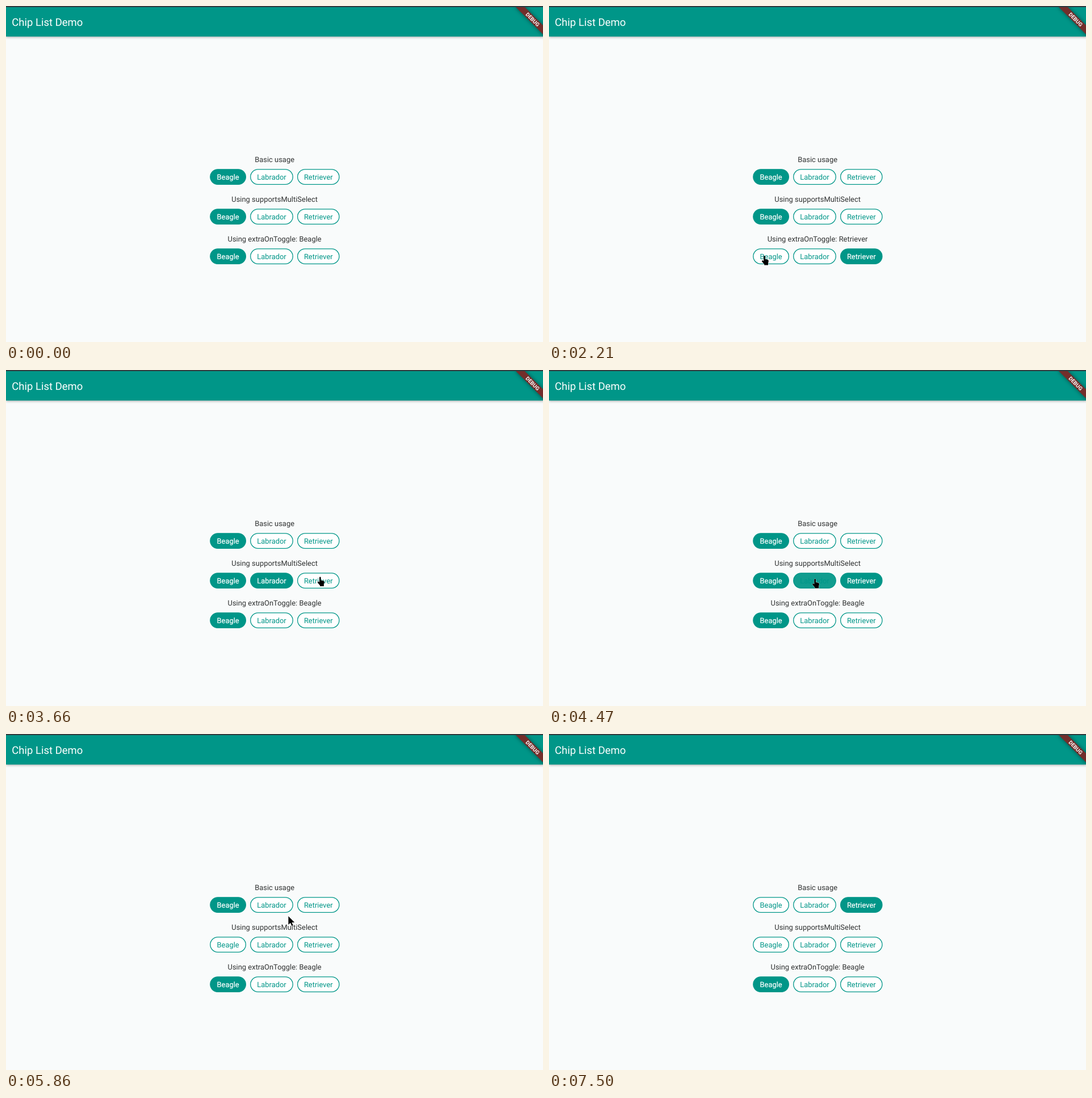
An HTML page that plays this animation: 946 px wide and 592 px high, repeating every 8.38 s.

```html
<!DOCTYPE html>
<html lang="en">
<head>
<meta charset="utf-8">
<title>Chip List Demo</title>
<style>
  html, body { margin: 0; width: 100%; height: 100%; overflow: hidden; background: #f9fbfb; }
  svg { display: block; width: 946px; height: 592px; font: 12.95px Roboto, sans-serif; text-rendering: geometricPrecision; }
  text { text-anchor: middle; }
  .label { fill: #303232; }
  .bar { fill: #009688; filter: drop-shadow(0 1.5px 2px rgba(0, 0, 0, .35)); }
  .title { fill: #fff; font-size: 18.5px; text-anchor: start; }
  .ribbon { fill: #732e2b; filter: drop-shadow(0 0 3.7px rgba(0, 0, 0, .5)); }
  .debug { fill: #fff; font-size: 9.4px; font-weight: 700; }
  .base { fill: #fff; }
  .face { fill: #009688; stroke: #009688; stroke-width: 1.3; }
  .chip text { fill: #009688; }
  .chip.on text { fill: #fff; stroke: #fff; stroke-width: .2; }
  #cursor { fill: #000; stroke: #fff; stroke-width: .7; stroke-linejoin: round; paint-order: stroke; }
</style>
</head>
<body>
<svg viewBox="0 0 946 592">
  <rect class="bar" width="946" height="53.8"/>
  <rect width="946" height="2" fill="#303b3e"/>
  <text class="title" x="10.3" y="34.5">Chip List Demo</text>
  <svg y="2" width="946" height="590" viewBox="0 2 946 590">
    <g transform="translate(950 1.5) rotate(45)">
      <rect class="ribbon" x="-37" y="25.9" width="74" height="11.1"/>
      <text class="debug" y="34.8">DEBUG</text>
    </g>
  </svg>
  <g id="rows"></g>
  <path id="cursor"/>
</svg>
<script>
const LOOP = 8380, ENTER = 390, EXIT = 7500;
const LABELS = ["Basic usage", "Using supportsMultiSelect", "Using extraOnToggle: "];
const MULTI_ROW = 1, EXTRA_ROW = 2;
const CHIP_TOP = 287.2, CHIP_H = 27.8, PITCH = 70, GAP = 7.1, STROKE = 1.3;

let nextX = 359.2;
const CHIPS = [["Beagle", 63.8], ["Labrador", 75.8], ["Retriever", 74.6]].map(([name, width]) => {
  const x = nextX;
  nextX += width + GAP;
  return { name, width, x, middle: x + width / 2 };
});

// Each row is clicked at a steady pace; aim is the pointer's offset from a chip's centre
// and dip is how far it sags while travelling along the row.
const VISITS = [
  { row: 2, order: [1, 2, 0], start: 845, step: 775, aim: [-11.5, -1], dip: 58 },
  { row: 1, order: [1, 2, 1, 0, 2], start: 3300, step: 560, aim: [-2.5, 1], dip: 16 },
  { row: 0, order: [1, 2], start: 6530, step: 450, aim: [7.75, 10], dip: 0 }
];
const SLANT = [3.25, -4], PRESS_LEAD = 180, LINGER = 50, TRAVEL = 400;

const CLICKS = VISITS.flatMap(({ row, order, start, step, aim, dip }) => order.map((chip, k) => ({
  row, chip, time: start + k * step, dip: k ? dip : 0,
  x: CHIPS[chip].middle + aim[0] + SLANT[0] * chip,
  y: CHIP_TOP + CHIP_H / 2 + row * PITCH + aim[1] + SLANT[1] * chip
})));
const STOPS = [
  { time: ENTER - LINGER, x: 470, y: 567 },
  ...CLICKS,
  { time: EXIT + PRESS_LEAD, x: 845, y: 575, dip: 0 }
];

const HAND = "M-1.4 1.1C-1.4-.5 1.2-.5 1.2 1.1V5.8L5.2 6.6Q7.5 7.1 7.2 9.5L6.4 13.5V16.4H-.4V15L-4.4 10.1Q-5.1 8.8-3.8 8.2Q-2.8 8-1.4 9.5Z";
const ARROW = "M0 0V15L3.6 11.8 6 17 8.3 16 6 11H10.8Z";

const clamp = v => Math.max(0, Math.min(1, v));
const smooth = u => u * u * (3 - 2 * u);

function add(parent, tag, attrs, content = "") {
  const node = document.createElementNS("http://www.w3.org/2000/svg", tag);
  for (const key in attrs) node.setAttribute(key, attrs[key]);
  node.textContent = content;
  return parent.appendChild(node);
}

const rowsGroup = document.getElementById("rows");
const cursor = document.getElementById("cursor");
const rows = LABELS.map((text, row) => {
  const group = add(rowsGroup, "g", { transform: `translate(0 ${row * PITCH})` });
  const label = add(group, "text", { class: "label", x: 473.1, y: 275 }, text);
  const chips = CHIPS.map(({ name, width, x, middle }) => {
    const chip = add(group, "g", { class: "chip" });
    const box = {
      x: x + STROKE / 2, y: CHIP_TOP + STROKE / 2, rx: (CHIP_H - STROKE) / 2,
      width: width - STROKE, height: CHIP_H - STROKE
    };
    const base = add(chip, "rect", { class: "base", ...box });
    const face = add(chip, "rect", { class: "face", ...box });
    add(chip, "text", { x: middle, y: 306 }, name);
    return { chip, base, face };
  });
  return { label, chips };
});

function pointerAt(t) {
  const next = STOPS.findIndex((stop, i) => i > 0 && (t < stop.time || i === STOPS.length - 1));
  const from = STOPS[next - 1], to = STOPS[next];
  const leave = from.time + LINGER;
  const duration = Math.min(TRAVEL, to.time - PRESS_LEAD - leave);
  const u = smooth(clamp((t - leave) / duration));
  return [
    from.x + (to.x - from.x) * u,
    from.y + (to.y - from.y) * u + to.dip * Math.sin(Math.PI * u)
  ];
}

function overChip(px, py) {
  return LABELS.some((_, row) => {
    const below = py - CHIP_TOP - row * PITCH;
    return below >= 0 && below <= CHIP_H &&
      CHIPS.some(({ x, width }) => px >= x - 1 && px <= x + width + 1);
  });
}

function stateAt(t) {
  const state = LABELS.map(() => CHIPS.map((_, i) => ({ on: i === 0, since: -LOOP, press: 0 })));
  for (const { time, row, chip: clicked } of CLICKS) {
    const press = clamp((t - time + PRESS_LEAD) / 60) * clamp((time + 40 - t) / 70);
    state[row].forEach((chip, i) => {
      const hit = i === clicked;
      if (hit) chip.press = Math.max(chip.press, press);
      const on = row === MULTI_ROW ? chip.on !== hit : hit;
      if (t >= time && on !== chip.on) Object.assign(chip, { on, since: time });
    });
  }
  return state;
}

function draw(t) {
  const state = stateAt(t);
  state.forEach((row, r) => row.forEach(({ on, since, press }, i) => {
    const { chip, base, face } = rows[r].chips[i];
    const age = t - since;
    chip.classList.toggle("on", on);
    face.style.fillOpacity = on ? 1 - (1 - clamp(age / 100)) ** 4 : 1 - clamp(age / 200) ** 2;
    base.style.filter = press ? `drop-shadow(0 3px 3px rgba(0, 0, 0, ${.3 * press}))` : "none";
  }));
  const chosen = state[EXTRA_ROW].findIndex(chip => chip.on);
  rows[EXTRA_ROW].label.textContent = LABELS[EXTRA_ROW] + CHIPS[chosen].name;

  const [x, y] = pointerAt(t);
  cursor.style.display = t >= ENTER && t < EXIT ? "" : "none";
  cursor.setAttribute("d", overChip(x, y) ? HAND : ARROW);
  cursor.setAttribute("transform", `translate(${x} ${y})`);
}

const start = performance.now();
function tick() {
  draw((performance.now() - start) % LOOP);
  requestAnimationFrame(tick);
}
tick();
</script>
</body>
</html>
```
